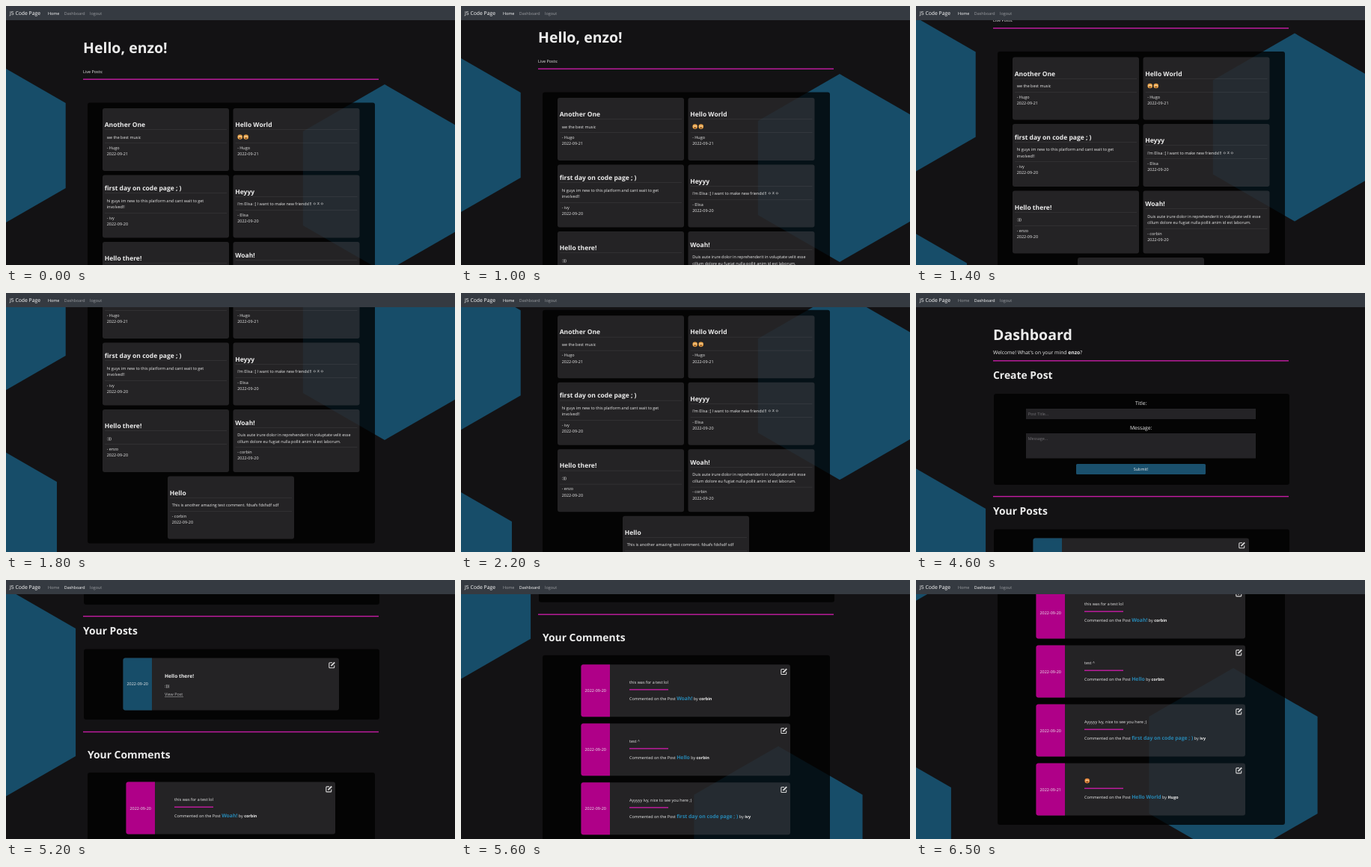
Recreate the animation shown at these times as an HTML page. Size 600x347 px, loop 7.2 s.

```html
<!DOCTYPE html>
<html lang="en">
<head>
<meta charset="utf-8">
<style>
html, body { margin: 0; width: 100%; height: 100%; overflow: hidden; background: #131214; }
svg { display: block; width: 600px; height: 347px; }
text { font: 5.45px "Open Sans", "Noto Sans CJK KR", "Noto Sans CJK", sans-serif; fill: #ececec; text-rendering: geometricPrecision; }
.b { font-weight: 700; }
.mid { text-anchor: middle; }
.link { font-weight: 700; font-size: 6.8px; fill: #2787b3; }
.hex { fill: #174d69; }
.panel { fill: rgba(0,0,0,.78); }
.card { fill: rgba(86,84,89,.4); }
</style>
</head>
<body>
<svg viewBox="0 0 600 347">
  <g id="home"></g>
  <g id="dash"></g>
  <rect width="600" height="19" fill="#353a41"/>
  <g id="nav"></g>
  <path id="hand" d="M-1 0q1-1 1.8 0v3l3.2.8q1 .4.8 1.6l-.7 3.2h-4.300l-2.400-3.300q0-1.200 1.600-.4z" fill="#fff" stroke="#111" stroke-width=".5"/>
</svg>
<script>
const $ = id => document.getElementById(id);
const PINK = '#c51ca3', SITE = 'J5 Code Page', ME = 'enzo';

const text = (x, y, s, size = 5.45, cls = '', fill = '') =>
  `<text x="${x}" y="${y}" class="${cls}" style="font-size:${size}px;${fill && 'fill:' + fill}">${s}</text>`;
const rect = (x, y, w, h, attrs = '') => `<rect x="${x}" y="${y}" width="${w}" height="${h}" ${attrs}/>`;
const panel = (x, y, w, h) => rect(x, y, w, h, 'class="panel" rx="3"');
const card = (x, y, w, h) => rect(x, y, w, h, 'class="card" rx="3"');
const rule = (y, x = 103, w = 395) => rect(x, y - .7, w, 1.4, `fill="${PINK}"`);
const bold = s => `<tspan class="b">${s}</tspan>`;

function hex(cx, cy, r) {
  const w = r * Math.sqrt(3) / 2, h = r / 2;
  return `<path class="hex" d="M${cx} ${cy - r}l${w} ${h}v${r}l${-w} ${h}l${-w} ${-h}v${-r}z"/>`;
}

function face(x, y, fill) {
  return `<circle cx="${x}" cy="${y}" r="3.300" fill="${fill}"/>` +
    [-1.2, 1.2].map(d => `<circle cx="${x + d}" cy="${y - .6}" r=".75" fill="#fff4dc"/>`).join('') +
    `<ellipse cx="${x}" cy="${y + 1.5}" rx=".8" ry="1" fill="#5a2a12"/>`;
}

function edit(x, y) {
  return `<g transform="translate(${x - 4.5} ${y - 4.5})" fill="none" stroke="#d8d8d8">
    <path d="M5 1.500H1.800q-1 0-1 1V7.500q0 1 1 1H6.700q1 0 1-1V5.200" stroke-width="1.1"/>
    <path d="M3.400 5.900L8.200 1.100" stroke-width="1.900"/></g>`;
}

// Home post: title block is centred in the card, so two-line bodies start higher
function post(x, y, title, lines, author, date) {
  const mid = y + (lines.length > 1 ? 17.5 : 22), extra = (lines.length - 1) * 8.5;
  const line = ly => rect(x + 3, ly, 163, .5, 'fill="#fff" opacity=".12"');
  return card(x, y, 169, 84) +
    text(x + 2.7, mid + 3, title, 8.5, 'b') + line(mid + 6.5) +
    lines.map((s, i) => text(x + 5.7, mid + 18.6 + i * 8.5, s)).join('') +
    line(mid + 24.5 + extra) +
    text(x + 5.7, mid + 33 + extra, '- ' + author) +
    text(x + 5.7, mid + 41.2 + extra, date);
}

function comment(i, body, title, author, date) {
  const y = 494.6 + 79 * i;
  return card(160.5, y, 279.5, 70) +
    `<path d="M199 ${y}h-35.500q-3 0-3 3v64q0 3 3 3h35.500z" fill="#af0088"/>` +
    text(179.7, y + 37, date, 5.45, 'mid') +
    (body ? text(225, y + 25.6, body) : face(228.7, y + 23.5, '#e98a3c')) +
    rule(y + 33.6, 225, 52) +
    text(225, y + 47.3, `Commented on the Post <tspan class="link">${title}</tspan> by ${bold(author)}`) +
    edit(431.5, y + 9.3);
}

const d20 = '2022-09-20', d21 = '2022-09-21', firstDay = 'first day on code page ; )';

$('home').innerHTML =
  hex(-19, 187, 114) + hex(506, 231, 126) + hex(-44.6, 478, 130) +
  text(103, 62.8, `Hello, ${ME}!`, 19.5, 'b') +
  text(103, 89.8, 'Live Posts:') + rule(98.2) +
  panel(109, 129.5, 384, 366) +
  post(129, 137, 'Another One', ['we the best music'], 'Hugo', d21) +
  post(303.5, 137, 'Hello World', [''], 'Hugo', d21) +
  face(312.7, 175.5, '#e5a047') + face(320.7, 175.5, '#e5a047') +
  post(129, 226.5, firstDay, ['hi guys im new to this platform and cant wait to get', 'involved!!'], 'ivy', d20) +
  post(303.5, 226.5, 'Heyyy', ["I'm Elisa :] I want to make new friends!!! ㅇㅈㅇ"], 'Elisa', d20) +
  post(129, 316, 'Hello there!', [':)))'], ME, d20) +
  post(303.5, 316, 'Woah!', ['Duis aute irure dolor in reprehenderit in voluptate velit esse',
    'cillum dolore eu fugiat nulla pollit anim id est laborum.'], 'corbin', d20) +
  post(216, 405.5, 'Hello', ['This is another amazing test comment. fdsafs fdsfsdf sdf'], 'corbin', d20);

$('dash').innerHTML =
  hex(-55, 374.5, 171) + hex(424, 734, 130) + hex(-57, 824, 120) +
  text(103, 62.5, 'Dashboard', 19.5, 'b') +
  text(103, 81.8, `Welcome! What's on your mind ${bold(ME)}?`, 6.8) + rule(90.8) +
  text(103, 115, 'Create Post', 13.9, 'b') +
  panel(104, 135, 395, 122) +
  text(300.7, 149.6, 'Title:', 6.8, 'mid') +
  rect(147, 155, 307, 14, 'fill="#242326"') + text(149.7, 164, 'Post Title...', 5.45, '', '#737276') +
  text(300.7, 182.6, 'Message:', 6.8, 'mid') +
  rect(147, 188, 307, 33.5, 'fill="#242326"') + text(149.7, 197, 'Message...', 5.45, '', '#737276') +
  rect(214, 229, 173, 14, 'fill="#1a506d" rx="1.500"') + text(300.5, 238, 'Submit!', 5.45, 'mid') +
  rule(272.6) + text(103, 297, 'Your Posts', 13.9, 'b') +
  panel(104, 316.5, 395, 94.5) + card(156.5, 328.5, 288.5, 70) +
  '<path d="M195 328.500h-35.500q-3 0-3 3v64q0 3 3 3h35.500z" class="hex"/>' +
  text(175.7, 365.2, d20, 5.45, 'mid') +
  text(212, 355.3, 'Hello there!', 6.7, 'b') + text(212, 367.5, ':)))') +
  text(212, 379, 'View Post', 5.45, '', '#bdbdbf') + rect(212, 380.5, 25, .5, 'fill="#bdbdbf"') +
  edit(435.5, 337.7) +
  rule(427.5) + text(109, 463, 'Your Comments', 13.9, 'b') +
  panel(109, 482, 384, 332) +
  comment(0, 'this was for a test lol', 'Woah!', 'corbin', d20) +
  comment(1, 'test ^', 'Hello', 'corbin', d20) +
  comment(2, 'Ayyyyy Ivy, nice to see you here ;)', firstDay, 'ivy', d20) +
  comment(3, '', 'Hello World', 'Hugo', d21);

$('nav').innerHTML = text(5, 12, SITE, 6.8, '', '#fff') +
  text(56, 11.5, 'Home') + text(77.7, 11.5, 'Dashboard') + text(112, 11.5, 'logout', 5.45, '', '#9b9da1');
const [, homeLink, dashLink] = $('nav').children;

// Linear interpolation through [time, value] points
function track(points, t) {
  const i = points.findIndex(p => p[0] > t);
  if (i === 0) return points[0][1];
  if (i < 0) return points[points.length - 1][1];
  const [a, u] = points[i - 1], [b, v] = points[i];
  return u + (v - u) * (t - a) / (b - a);
}

const homeScroll = [[700, 0], [1000, 14], [1400, 68.5], [1700, 148], [1800, 160], [2000, 160], [2600, 0]];
const dashScroll = [[4600, 0], [4800, 50], [5200, 224], [5800, 460], [6000, 486]];
const handX = [[2900, 70], [3100, 78.5], [3600, 90]];
const handY = [[2900, 36], [3100, 15.5], [3600, 9]];

function draw(now) {
  const t = Math.floor(now % 7200 / 100) * 100, onDash = t >= 3900;
  $('home').style.display = onDash ? 'none' : '';
  $('dash').style.display = onDash ? '' : 'none';
  $('home').setAttribute('transform', `translate(0 ${-track(homeScroll, t)})`);
  $('dash').setAttribute('transform', `translate(0 ${-track(dashScroll, t)})`);
  homeLink.style.fill = onDash ? '#9b9da1' : '#fff';
  dashLink.style.fill = onDash ? '#fff' : t >= 3100 ? '#b9bbbe' : '#9b9da1';
  $('hand').style.display = t >= 3000 && !onDash ? '' : 'none';
  $('hand').setAttribute('transform', `translate(${track(handX, t)} ${track(handY, t)})`);
}

let start;
function tick(now) {
  start ??= now;
  draw(now - start);
  requestAnimationFrame(tick);
}
draw(0);
requestAnimationFrame(tick);
</script>
</body>
</html>
```
